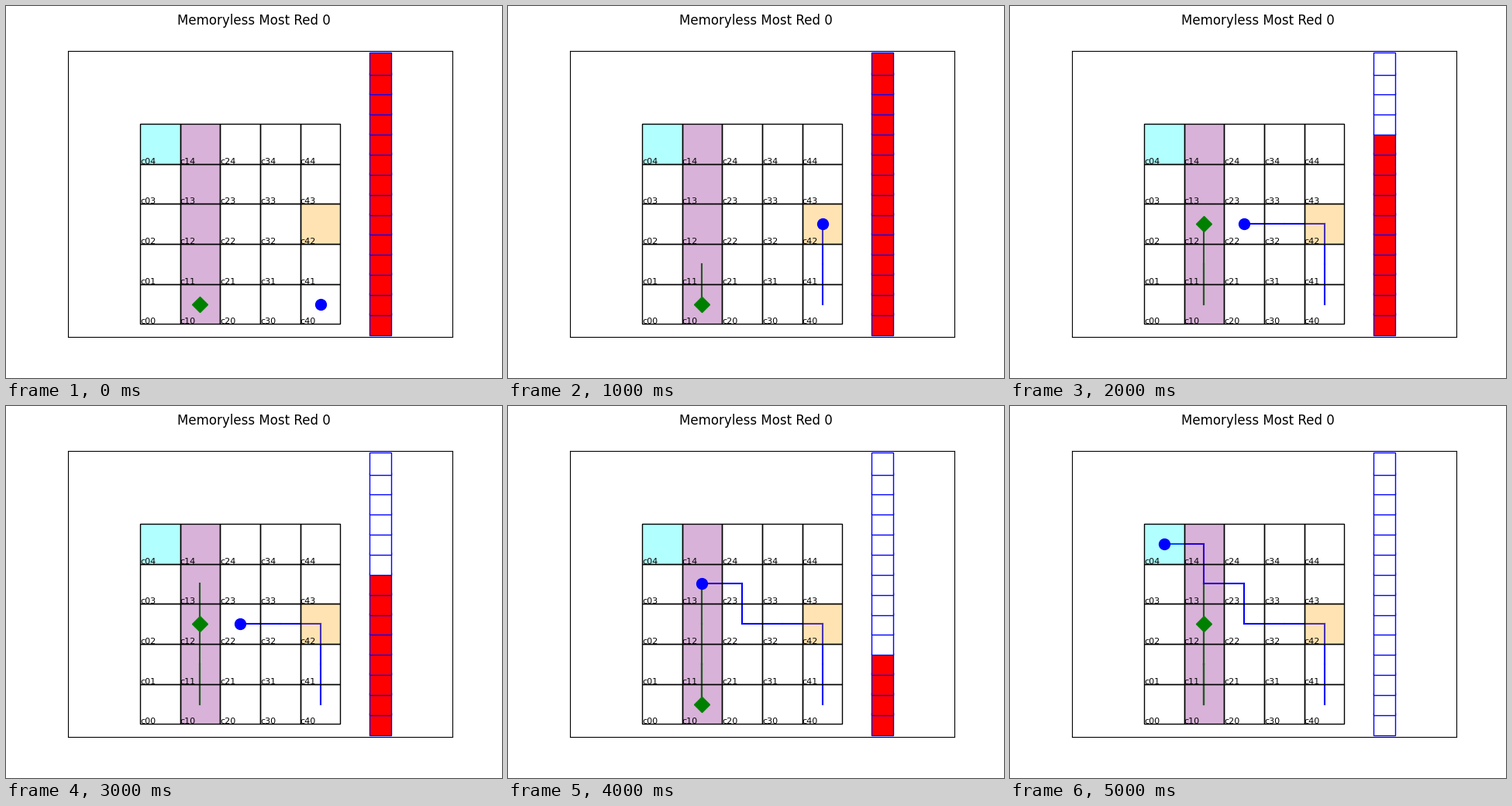
Recreate the animation shown at these times as a matplotlib script. Size 640 by 480 pixels, loop 5.5 s.

```python
import matplotlib.pyplot as plt
from matplotlib.animation import FuncAnimation
from matplotlib.patches import Rectangle

N = 5            # grid cells per side
TANK = 14        # fuel units
UNIT = 0.55      # side of one fuel square
STEP_MS = 500

# Cell and fuel level at every step
BLUE = [(4, 0), (4, 1), (4, 2), (3, 2), (2, 2), (2, 2),
        (2, 2), (2, 3), (1, 3), (1, 4), (0, 4)]
GREEN = [(1, row) for row in (0, 1, 0, 1, 2, 3, 2, 1, 0, 1, 2)]
FUEL = [14, 12, 14, 12, 10, 9, 8, 6, 4, 2, 0]

fig = plt.figure(figsize=(6.4, 4.8), dpi=100)
fig.suptitle("Memoryless Most Red 0", fontsize=12)
ax = fig.add_axes([0.125, 0.11, 0.775, 0.77])
ax.set_xticks([])
ax.set_yticks([])

# Square cells: the height sets the scale, the width follows from it
y_min, y_max = -0.325, 6.825
half = (y_max - y_min) * 496 / 369.6 / 2
ax.set_xlim(3 - half, 3 + half)
ax.set_ylim(y_min, y_max)


def tint(col, row, color):
    ax.add_patch(Rectangle((col, row), 1, 1, fc=color, ec="none", alpha=0.3))


def center(cell):
    return cell[0] + 0.5, cell[1] + 0.5


def make_trail(path, color):
    """One hidden line per step, lying below the tinted cells."""
    lines = []
    for a, b in zip(path, path[1:]):
        (x0, y0), (x1, y1) = center(a), center(b)
        style = dict(color=color, lw=1.5, zorder=0.5, visible=False)
        lines += ax.plot([x0, x1], [y0, y1], **style)
    return lines


tint(0, 4, "cyan")
tint(4, 2, "orange")
for row in range(N):
    tint(1, row, "purple")

for col in range(N):
    for row in range(N):
        ax.add_patch(Rectangle((col, row), 1, 1, fill=False, ec="black", lw=1))
        ax.text(col, row, f"c{col}{row}", fontsize=8)

gauge = [
    ax.add_patch(Rectangle((6 - UNIT / 2, k / 2 - UNIT / 2), UNIT, UNIT,
                           fc="red", ec="blue", lw=1))
    for k in range(TANK)
]

agents = []
for path, color, marker in ((GREEN, "green", "D"), (BLUE, "blue", "o")):
    dot, = ax.plot([], [], marker, color=color, ms=10, zorder=2.5)
    agents.append((path, dot, make_trail(path, color)))


def draw(step):
    for k, box in enumerate(gauge):
        box.set_facecolor("red" if k < FUEL[step] else "white")
    for path, dot, trail in agents:
        x, y = center(path[step])
        dot.set_data([x], [y])
        for k, line in enumerate(trail):
            line.set_visible(k < step and path[k] != path[k + 1])
    return []


anim = FuncAnimation(fig, draw, frames=len(FUEL), interval=STEP_MS,
                     repeat=True, repeat_delay=0)
plt.show()
```
